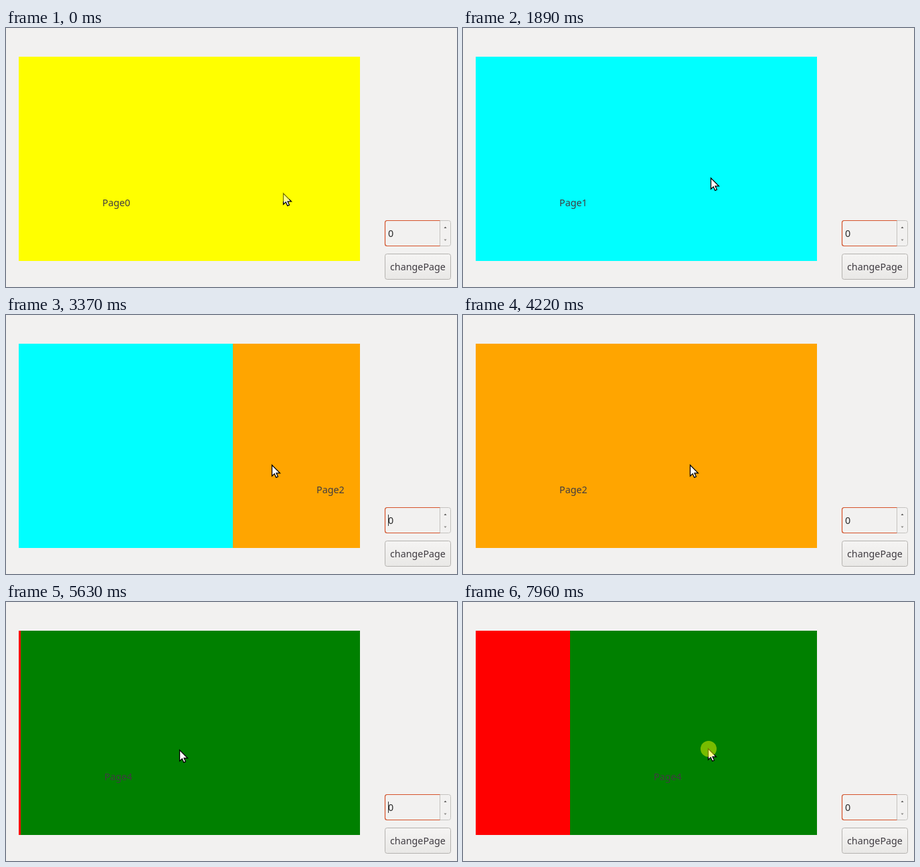
Recreate the animation shown at these times as an HTML page. Size 674 by 388 pixels, loop 8000 ms.

```html
<!DOCTYPE html>
<html lang="en">
<head>
<meta charset="utf-8">
<title>Swipe pages</title>
<style>
  html, body { margin: 0; width: 100%; height: 100%; overflow: hidden; background: #f2f1f0; }
  svg { display: block; }
  text { font: 14.3px "Noto Sans", "Open Sans", sans-serif; fill: #403c42; }
  .field text { fill: #2c2c2c; }
</style>
</head>
<body>
<svg width="674" height="388" viewBox="0 0 674 388">
  <defs>
    <clipPath id="pane"><rect x="19" y="43" width="510" height="306"/></clipPath>
    <linearGradient id="face" x2="0" y2="1">
      <stop offset="0" stop-color="#f5f4f3"/><stop offset="1" stop-color="#e9e8e6"/>
    </linearGradient>
  </defs>
  <g clip-path="url(#pane)"><g id="pages"></g></g>

  <g class="field">
    <rect x="566.5" y="288.5" width="98" height="38" rx="3" fill="#f2f1f0" stroke="#c4c2bf"/>
    <path d="M648.5 288.5H569.5a3 3 0 0 0-3 3V323.5a3 3 0 0 0 3 3H648.5" fill="none" stroke="#d5522a" stroke-width="1.2"/>
    <path d="M648.5 289V326" stroke="#c4c2bf"/>
    <path d="M654.5 300h4l-2-2.5z" fill="#5a5a58"/>
    <path d="M654.5 316.5h4l-2 2.5z" fill="#8a8986"/>
    <text x="571" y="313">0</text>
    <path id="caret" d="M571.5 299V316" stroke="#333"/>
  </g>
  <rect x="566.5" y="338.5" width="98" height="38" rx="3" fill="url(#face)" stroke="#b4b2af"/>
  <text x="574" y="363">changePage</text>

  <g id="mouse">
    <path d="M.5 .8V17.2L4.2 13.8 6.7 19.3 9.4 18.1 7 12.8H12.4z" fill="#fff" stroke="#000" stroke-width="1.3"/>
    <circle id="press" cx="1" cy="1" r="12" fill="#ff0" fill-opacity=".47"/>
  </g>
</svg>
<script>
const LOOP = 8000, WIDTH = 510, SETTLE = 420, BLINK = 1012;
const colors = ['yellow', 'cyan', 'orange', 'red', 'green'];
const LAST = (colors.length - 1) * WIDTH;

// Each swipe: press time, release time, pointer x from and to, page it settles on
const swipes = [
  [0, 230, 414, 414, 0],
  [1300, 1470, 425, 370, 1],
  [2300, 2620, 370, 430, 1],
  [3230, 3320, 435, 397, 2],
  [4400, 4500, 334, 300, 3],
  [5190, 5289, 302, 242, 4],
  [6300, 6850, 307, 223.3, 4],
  [7300, LOOP, 225, 367.4, 4],
].map(([press, release, from, to, page]) => ({ press, release, from, to, page }));

const $ = id => document.getElementById(id);
const mix = (a, b, k) => a + (b - a) * k;
const span = (t, from, to) => Math.min(1, Math.max(0, (t - from) / (to - from)));
const smooth = u => u * u * (3 - 2 * u);
const easeOut = u => 1 - (1 - u) ** 3;

$('pages').innerHTML = colors.map((color, i) =>
  `<g transform="translate(${19 + i * WIDTH} 43)"><rect width="${WIDTH}" height="306" fill="${color}"/>` +
  `<text x="125" y="224">Page${i}</text></g>`).join('');

// Dragging past the last page moves at half speed
const resist = x => x > LAST ? (x + LAST) / 2 : x;

function draw(now) {
  const t = now % LOOP;
  const i = swipes.findLastIndex(s => s.press <= t);
  const swipe = swipes[i], next = swipes[i + 1];
  const down = t < swipe.release;
  const start = i ? swipes[i - 1].page * WIDTH : 0;

  const x = down
    ? mix(swipe.from, swipe.to, smooth(span(t, swipe.press, swipe.release)))
    : mix(swipe.to, next.from, smooth(span(t, swipe.release, next.press)));
  const y = 224 + 23 * (1 - smooth(span(t, 0, 1250))) - 5.5 * smooth(span(t, 3700, 7100));

  const dragged = resist(start + swipe.from - (down ? x : swipe.to));
  const settled = easeOut(span(t, swipe.release, swipe.release + SETTLE));
  const offset = mix(dragged, swipe.page * WIDTH, settled);

  const blink = (t - 230 + BLINK) % BLINK < BLINK / 2;
  $('pages').setAttribute('transform', `translate(${-Math.round(offset)})`);
  $('mouse').setAttribute('transform', `translate(${Math.round(x)} ${Math.round(y)})`);
  $('caret').setAttribute('visibility', blink ? 'visible' : 'hidden');
  $('press').setAttribute('visibility', down ? 'visible' : 'hidden');
  requestAnimationFrame(draw);
}
requestAnimationFrame(draw);
</script>
</body>
</html>
```
